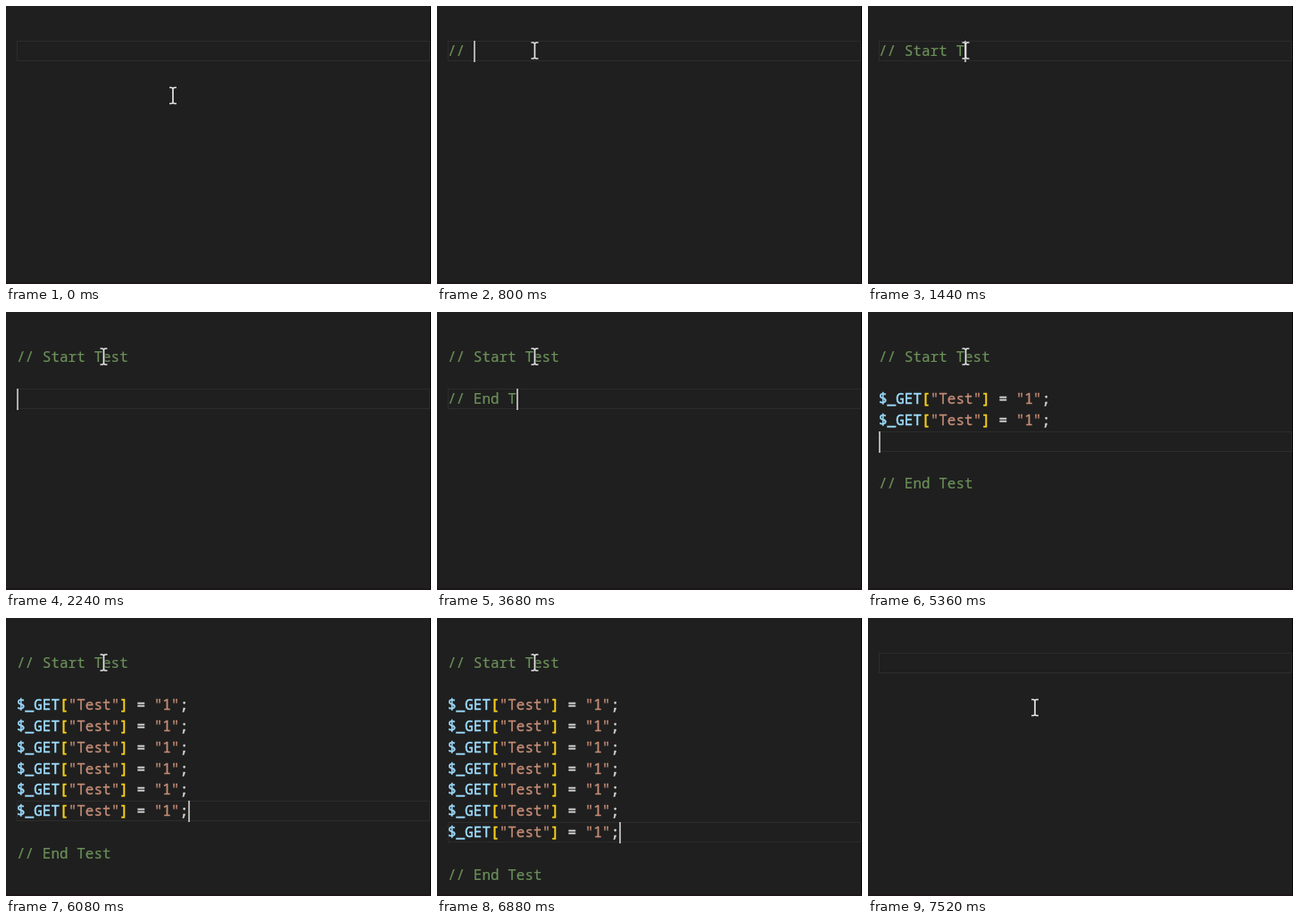
An HTML page that plays this animation: 476 px wide and 312 px high, repeating every 7920 ms.

```html
<!DOCTYPE html>
<html lang="en">
<head>
<meta charset="utf-8">
<title>Typing in an editor</title>
<style>
  html, body { margin: 0; width: 100%; height: 100%; overflow: hidden; background: #1f1f1f; }
  svg { display: block; }
  text { font: 16px "Noto Sans Mono", "DejaVu Sans Mono", monospace; white-space: pre; }
  tspan { fill: var(--ink); stroke: var(--ink); stroke-width: 0.5; }
  .comment { --ink: #6b9059; stroke-width: 0.2; }
  .name { --ink: #9cdcfe; }
  .bracket { --ink: #f5cf1b; }
  .string { --ink: #c68d76; stroke-width: 0.3; }
  .plain { --ink: #d4d4d4; }
  #mouse { filter: drop-shadow(1px 0 0 #1118); }
</style>
</head>
<body>
<svg width="476" height="312" viewBox="0 0 476 312">
  <rect width="476" height="312" fill="#1f1f1f"/>
  <rect id="line" x="12.5" width="462" height="22" fill="none" stroke="#2c2c2c"/>
  <g id="code"></g>
  <rect id="caret" width="2" height="24" fill="#aeafad"/>
  <path id="mouse" fill="none" stroke="#e4e4e4" stroke-width="1.7"
    d="M-4-9H-1.5L0-8 1.5-9H4M0-8V8M-4 9H-1.5L0 8 1.5 9H4"/>
  <rect x="475" width="1" height="312" fill="#060606"/>
  <rect y="310" width="476" height="2" fill="#1c161a"/>
</svg>
<script>
const LOOP = 7920, TICK = 80, LEFT = 12, ADVANCE = 9.6;
const PASTE = '$_GET["Test"] = "1";';
const $ = id => document.getElementById(id);
const rowTop = row => Math.round(38.8 + 23.77 * row);

// Editor actions
const doc = { lines: [''], row: 0, col: 0, caret: false };
const type = text => d => {
  d.lines[d.row] += text;
  d.col = d.lines[d.row].length;
};
const enter = d => {
  d.lines.splice(++d.row, 0, '');
  d.col = 0;
};
const up = d => {
  d.row--;
  d.col = Math.min(d.col, d.lines[d.row].length);
};
const show = () => {};
const hide = d => { d.caret = false; };
const clear = d => Object.assign(d, { lines: [''], row: 0, col: 0, caret: false });
const keys = (start, text) => [...text].map((c, i) => [start + i * TICK, type(c)]);

const steps = [
  [240, show], [640, type('//')],
  ...keys(800, ' Start '), ...keys(1440, 'Test'),
  [1920, enter], [2240, enter],
  ...keys(2400, '//'), [2720, hide],
  ...keys(2960, ' E'), ...keys(3280, 'nd '),
  [3680, type('T')], [3760, type('es')], [3840, type('t')],
  [4080, hide], [4240, up], [4400, enter], [4560, enter], [4640, up], [4800, hide],
  [4960, type(PASTE)], [5120, enter],
  [5200, type(PASTE)], [5360, enter],
  [5520, type(PASTE)], [5680, enter],
  [5760, type(PASTE)], [5840, enter],
  [5920, type(PASTE)], [6000, enter],
  [6080, type(PASTE)], [6240, enter], [6400, type(PASTE)],
  [6640, hide], [6880, show], [7200, hide], [7360, clear]
];

const copy = time => ({ ...doc, time, lines: [...doc.lines] });
const states = [copy(0)];
for (const [time, act] of steps) {
  doc.caret = true;
  act(doc);
  states.push(copy(time));
}

function colour(token) {
  if (token.startsWith('//')) return 'comment';
  if (token[0] === '$') return 'name';
  if (token[0] === '"') return 'string';
  return /[[\]]/.test(token) ? 'bracket' : 'plain';
}

function lineMarkup(line, row) {
  const tokens = line.match(/\/.*|\$\w+|"[^"]*"|[[\]]|[^[\]"$]+/g) || [];
  const spans = tokens.map(t => `<tspan class="${colour(t)}">${t}</tspan>`);
  return `<text x="${LEFT}" y="${rowTop(row) + 17}">${spans.join('')}</text>`;
}

function mouseAt(time) {
  if (time >= 7360) return [187, 100.5];
  const p = Math.min(1, Math.floor(time / TICK) / 4);
  const e = p * p * (3 - 2 * p);
  return [187 - 77.5 * e, 100.5 - 50.5 * e];
}

let current;
function draw() {
  const time = performance.now() % LOOP;
  const state = states.findLast(s => s.time <= time);
  if (state !== current) {
    current = state;
    const top = rowTop(state.row);
    $('code').innerHTML = state.lines.map(lineMarkup).join('');
    $('line').setAttribute('y', top + 0.5);
    $('caret').setAttribute('x', Math.round(LEFT + 0.4 + ADVANCE * state.col));
    $('caret').setAttribute('y', top);
    $('caret').setAttribute('visibility', state.caret ? 'visible' : 'hidden');
  }
  $('mouse').setAttribute('transform', `translate(${mouseAt(time)})`);
  requestAnimationFrame(draw);
}
draw();
</script>
</body>
</html>
```
